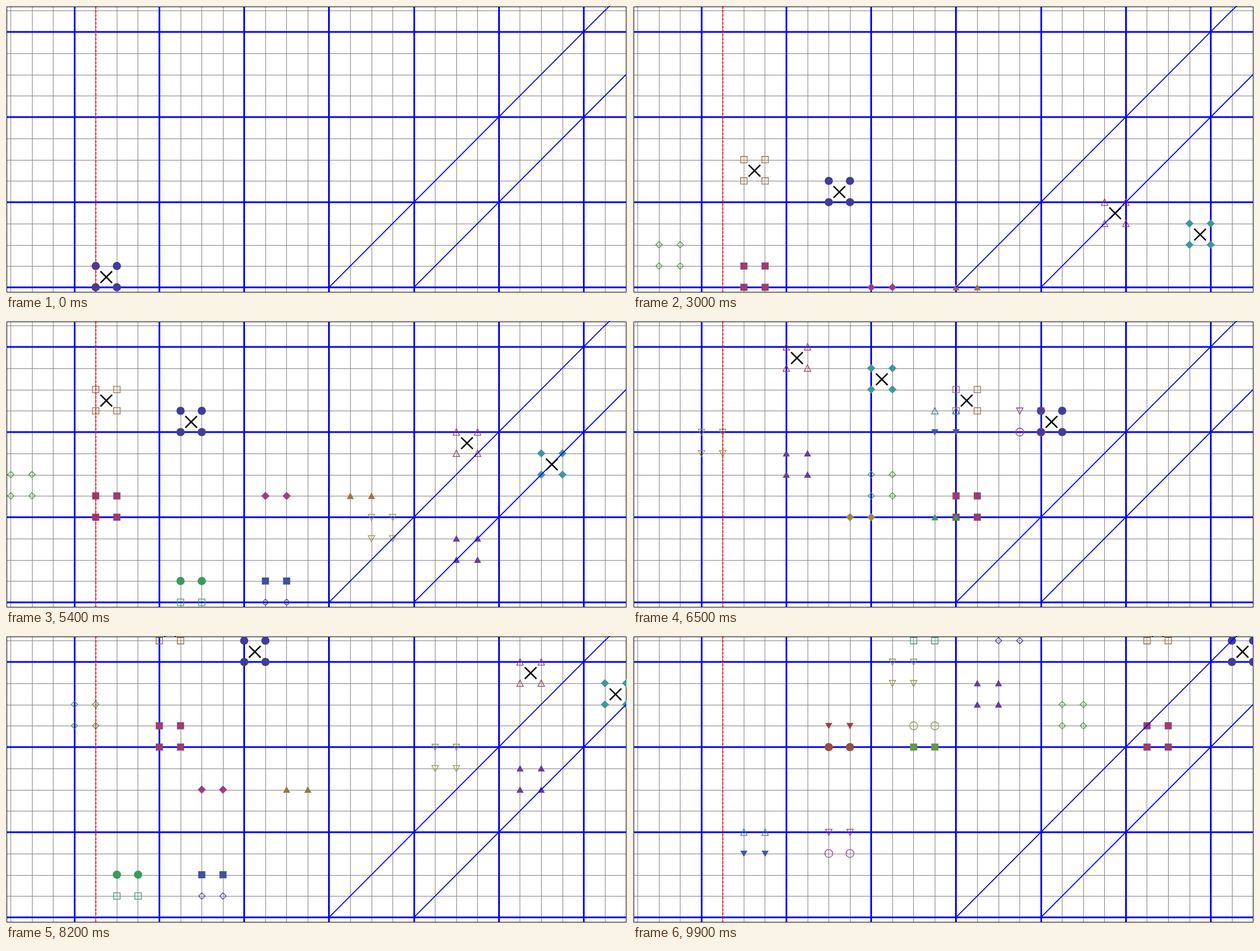
Recreate the animation shown at these times as an HTML page with a canvas. Size 1099 px wide and 509 px high, loop 10 s.

```html
<!DOCTYPE html>
<html lang="en">
<head>
<meta charset="utf-8">
<title>Pipelined tile traversal</title>
<style>
  html, body { margin: 0; width: 100%; height: 100%; overflow: hidden; background: #fff; }
  canvas { display: block; }
</style>
</head>
<body>
<canvas id="stage" width="1099" height="509"></canvas>
<script>
const ctx = document.getElementById('stage').getContext('2d');
const STEP_MS = 100, STEPS = 100, PASS = 25, LANES = 4;
const PHI = (1 + Math.sqrt(5)) / 2;

// Lattice to pixels
const px = x => 158.7 + 37.55 * x;
const py = y => 498.9 - 37.74 * y;

function line(x1, y1, x2, y2, color, width) {
  ctx.strokeStyle = color;
  ctx.lineWidth = width;
  ctx.beginPath();
  ctx.moveTo(x1, y1);
  ctx.lineTo(x2, y2);
  ctx.stroke();
}

function drawGrid() {
  for (const thick of [false, true]) {
    const color = thick ? '#00f' : '#808080', width = thick ? 3 : 1;
    for (let i = -4; i < 25; i++) {
      if (((i + 1) % 4 === 0) !== thick) continue;
      const x = Math.floor(px(i) + 0.2) + 0.5;
      line(x, 1, x, 507, color, width);
    }
    for (let j = 0; j < 14; j++) {
      if ((j % 4 === 0) !== thick) continue;
      const y = Math.round(py(j) + 0.2) + (thick ? 0 : 0.5);
      line(1, y, 1097, y, color, width);
    }
  }
  ctx.strokeStyle = '#000';
  ctx.lineWidth = 1;
  ctx.strokeRect(1.5, 1.5, 1096, 506);
}

function drawGuides() {
  line(px(11), py(0), px(24), py(13) - 0.4, '#00f', 1.8);
  line(px(24) - 37.55, py(13) - 0.4, px(24) - 37.55, py(13) - 0.4, '#00f', 1.8);
  line(px(24), py(13), px(25), py(14), '#00f', 1.8);
  line(px(15), py(0), px(25), py(10), '#00f', 1.8);
  ctx.setLineDash([5, 2]);
  line(159, 0, 159, 507, '#f00', 1.6);
  ctx.setLineDash([]);
}

function polygon(points) {
  points.forEach(([x, y], i) => i ? ctx.lineTo(x, y) : ctx.moveTo(x, y));
  ctx.closePath();
}

// Ten marker shapes repeat: five filled, then the same five open
function marker(index, x, y) {
  const shape = (index - 1) % 5, open = (index - 1) % 10 > 4;
  const hue = (0.67 + 2 * (index - 1) / PHI) % 1 * 360;
  const color = `hsl(${hue}, 42.86%, 42%)`;
  const s = open ? 5.7 : 6.3;
  ctx.save();
  ctx.translate(px(x), py(y));
  ctx.beginPath();
  if (shape === 0) ctx.arc(0, 0, open ? 7 : 7.3, 0, 2 * Math.PI);
  if (shape === 1) ctx.rect(-s, -s, 2 * s, 2 * s);
  if (shape === 2) {
    const d = open ? 5.7 : 7.2;
    polygon([[0, -d], [d, 0], [0, d], [-d, 0]]);
  }
  if (shape === 3) polygon([[0, -6], [s, 5.6], [-s, 5.6]]);
  if (shape === 4) polygon([[0, 6], [s, -5], [-s, -5]]);
  if (open) {
    ctx.strokeStyle = color;
    ctx.lineWidth = 1.3;
    ctx.stroke();
  } else {
    ctx.fillStyle = color;
    ctx.fill();
  }
  ctx.restore();
}

function pair(index, x, y) {
  if (y < 0) return;
  marker(index, x, y);
  marker(index, x + 1, y);
}

function tile(index, x, y) {
  if (y < 0) return;
  pair(index, x, y);
  pair(index, x, y + 1);
}

function cross(x, y) {
  const cx = px(x + 0.5), cy = py(y + 0.5) + 0.8, r = 10.3;
  line(cx - r, cy - r, cx + r, cy + r, '#000', 2.6);
  line(cx - r, cy + r, cx + r, cy - r, '#000', 2.6);
}

function drawStep(step) {
  ctx.fillStyle = '#fff';
  ctx.fillRect(0, 0, 1099, 509);
  drawGrid();
  ctx.save();
  ctx.beginPath();
  ctx.rect(0, 0, 1098, 509);
  ctx.clip();

  const crosses = [];
  for (let lane = 0; lane < LANES; lane++) {
    const clock = step - 4 * lane;
    if (clock < 0) break;
    const u = clock % PASS;
    const row = lane + LANES * Math.floor(clock / PASS);
    const first = 6 * lane + 1;
    tile(first, u, row);
    tile(first + 1, u - 4, row - 4);
    // Two trailing fronts run down the diagonal once they reach this row
    [11, 15].forEach((start, k) => {
      if (u < start) return;
      const x = start + 10 - u, y = row + start - u;
      pair(first + 2 + 2 * k, x, y);
      pair(first + 3 + 2 * k, x + 4, y);
    });
    crosses.push([u, row]);
  }
  drawGuides();
  crosses.forEach(([x, y]) => cross(x, y));
  ctx.restore();
}

let shown = -1;
function tick() {
  const step = Math.floor(performance.now() / STEP_MS) % STEPS;
  if (step !== shown) drawStep(shown = step);
  requestAnimationFrame(tick);
}
tick();
</script>
</body>
</html>
```
